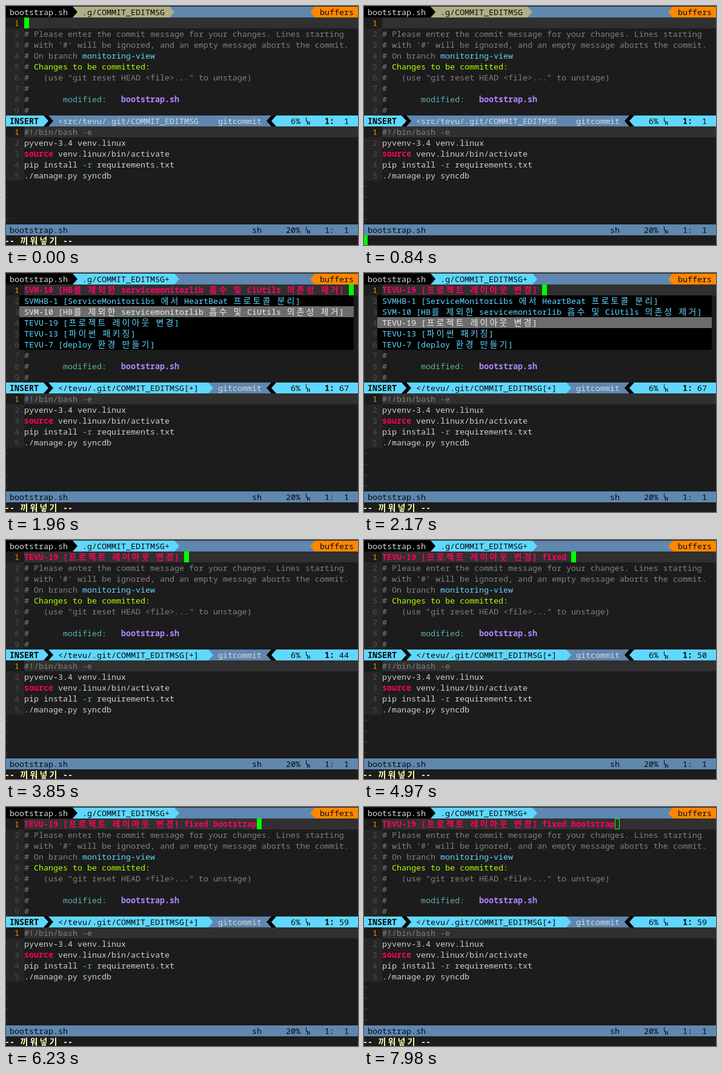
An HTML page for the animation above (8.12 s loop, 581x395 px).

```html
<!DOCTYPE html>
<html lang="ko">
<head>
<meta charset="utf-8">
<title>Commit message completion</title>
<style>
  html, body { margin: 0; width: 100%; height: 100%; overflow: hidden; background: #1c1c1c; }
  #term {
    position: absolute; left: 0; top: 0; width: 581px; height: 395px; overflow: hidden;
    background: #1c1c1c; color: #d0d0d0;
    font: 13.3333px/18px "Noto Sans Mono", "DejaVu Sans Mono", monospace;
    font-kerning: none; font-variant-ligatures: none;
  }
  #term div, #term svg { position: absolute; height: 18px; white-space: pre; }
  /* Hangul takes two cells */
  i {
    display: inline-block; width: 16px; text-align: center;
    font: normal 14px/1 "Noto Sans CJK KR", "Noto Sans CJK", "Noto Sans CJK JP", sans-serif;
    font-weight: inherit;
  }
  .b { font-weight: bold; }
  .right { clip-path: polygon(0 0, 100% 50%, 0 100%); }
  .left { clip-path: polygon(100% 0, 0 50%, 100% 100%); }
  .hollow { box-sizing: border-box; border: 1px solid #00ff00; }
</style>
</head>
<body>
<div id="term"></div>
<script>
const LOOP = 8120, COLS = 73;
const C = {
  text: '#d0d0d0', light: '#dadada', dark: '#080808', black: '#000000',
  gutter: '#262626', number: '#4e4e4e', line: '#303030', comment: '#808080',
  orange: '#ff8700', khaki: '#afaf87', blue: '#5f87af', cyan: '#5fd7ff',
  lime: '#afff00', teal: '#5fafaf', purple: '#af87ff', pink: '#ff005f',
  green: '#00ff00', select: '#6c6c6c', white: '#eeeeee', mode: '#ffffaf'
};
const ISSUES = [
  'SVMHB-1 [ServiceMonitorLibs 에서 HeartBeat 프로토콜 분리]',
  'SVM-10 [HB를 제외한 servicemonitorlib 흡수 및 CiUtils 의존성 제거]',
  'TEVU-19 [프로젝트 레이아웃 변경]',
  'TEVU-13 [파이썬 패키징]',
  'TEVU-7 [deploy 환경 만들기]'
];
const TYPED = 'fixed bootstrap';
// One key per entry; two keys land together at 5320
const KEYS = [4410, 4550, 4620, 4760, 4900, 4970, 5110, 5180,
              5320, 5320, 5740, 5880, 6020, 6090, 6230];

const term = document.getElementById('term');
const cell = (row, col) => `left:${col * 8 - 2}px;top:${row * 18 + 1}px`;
const cells = s => [...s].reduce((n, ch) => n + (/[가-힣]/.test(ch) ? 2 : 1), 0);
const fill = (row, col, width, color, cls = '') =>
  `<div class="${cls}" style="${cell(row, col)};width:${width * 8}px;background:${color}"></div>`;
const put = (row, col, s, color = C.text, cls = '') =>
  `<div class="${cls}" style="${cell(row, col)};color:${color}">` +
  s.replace(/</g, '&lt;').replace(/[가-힣]/g, '<i>$&</i>') + '</div>';
const lineMark = (row, color) =>
  `<svg width="8" height="18" style="${cell(row, 62)}" fill="none" stroke="${color}">` +
  '<path d="M1.5 3V9.5H4.5M3.5 15.5V10L7 15V9.5"/></svg>';

function gutter(top, count, total) {
  let out = fill(top, 4, COLS - 4, C.line);
  for (let n = 1; n <= count; n++) {
    if (n > 1) out += fill(top + n - 1, 0, 4, C.gutter);
    out += put(top + n - 1, 2, String(n), n > 1 ? C.number : C.orange);
  }
  return out;
}

function tabs(modified) {
  const color = modified ? C.cyan : C.khaki;
  const name = '.g/COMMIT_EDITMSG' + (modified ? '+' : '');
  const end = 17 + name.length;
  return fill(0, 0, COLS, C.blue) + fill(0, 14, end - 14, color) +
    fill(0, end, 1, color, 'right') +
    fill(0, 0, 14, C.black) + fill(0, 14, 1, C.black, 'right') +
    put(0, 1, 'bootstrap.sh', C.light) + put(0, 16, name, C.dark) +
    fill(0, 63, 1, C.orange, 'left') + fill(0, 64, 9, C.orange) +
    put(0, 65, 'buffers', C.dark);
}

function status(modified, column) {
  const r = 10;
  let out = fill(r, 0, COLS, C.blue);
  if (modified) out += fill(r, 9, 33, C.cyan) + fill(r, 42, 1, C.cyan, 'right');
  return out +
    fill(r, 8, 1, C.black) + fill(r, 9, 1, C.black, 'right') +
    fill(r, 0, 8, C.cyan) + fill(r, 8, 1, C.cyan, 'right') +
    put(r, 1, 'INSERT', C.dark, 'b') +
    put(r, 11, modified ? '</tevu/.git/COMMIT_EDITMSG[+]' : '<src/tevu/.git/COMMIT_EDITMSG',
        modified ? C.dark : C.light) +
    put(r, 44, 'gitcommit', C.light) +
    fill(r, 54, 1, C.black, 'left') + fill(r, 55, 1, C.black) +
    fill(r, 55, 1, C.cyan, 'left') + fill(r, 56, 17, C.cyan) +
    put(r, 59, '6%', C.dark) + lineMark(r, C.dark) +
    put(r, 66, '1:', C.dark, 'b') + put(r, 68, String(column).padStart(3), C.dark);
}

const commitText =
  put(2, 4, '# Please enter the commit message for your changes. Lines starting', C.comment) +
  put(3, 4, "# with '#' will be ignored, and an empty message aborts the commit.", C.comment) +
  put(4, 4, '# On branch', C.comment) + put(4, 16, 'monitoring-view', C.cyan) +
  put(5, 4, '#', C.comment) + put(5, 6, 'Changes to be committed:', C.lime) +
  put(6, 4, '#   (use "git reset HEAD <file>..." to unstage)', C.comment) +
  put(7, 4, '#', C.comment) +
  put(8, 4, '#', C.comment) + put(8, 12, 'modified:', C.teal) +
  put(8, 24, 'bootstrap.sh', C.purple, 'b') +
  put(9, 4, '#', C.comment);

const script = gutter(11, 5) +
  put(11, 4, '#!/bin/bash -e', C.comment) +
  put(12, 4, 'pyvenv-3.4 venv.linux') +
  put(13, 4, 'source', C.pink, 'b') + put(13, 11, 'venv.linux/bin/activate') +
  put(14, 4, 'pip install') + put(14, 16, '-r', C.teal) + put(14, 19, 'requirements.txt') +
  put(15, 4, './manage.py syncdb') +
  [16, 17, 18, 19].map(r => put(r, 0, '~', C.number)).join('') +
  fill(20, 0, COLS, C.blue) +
  put(20, 1, 'bootstrap.sh', C.dark) + put(20, 51, 'sh', C.dark) +
  put(20, 58, '20%', C.dark) + lineMark(20, C.dark) + put(20, 66, '1:  1', C.dark);

function popup(selected) {
  return ISSUES.map((s, i) => {
    const on = i === selected;
    return fill(i + 2, 3, 69, on ? C.select : C.black) +
      put(i + 2, 4, s, on ? C.white : C.cyan);
  }).join('');
}

function stateAt(t) {
  return {
    modified: t >= 1260,
    busy: t >= 840 && t < 1260,
    open: t >= 1260 && t < 3850,
    pick: t < 1960 ? 0 : t < 2170 ? 1 : 2,
    typed: KEYS.filter(k => t >= k).length,
    focus: t < 7980
  };
}

function view(s) {
  const message = s.modified ? ISSUES[s.pick] + ' ' + TYPED.slice(0, s.typed) : '';
  const column = !s.modified ? 1 : s.open ? 67 : 44 + s.typed;
  const [row, col] = s.busy ? [21, 0] : [1, 4 + cells(message)];
  return tabs(s.modified) + gutter(1, 9) + commitText +
    put(1, 4, message, C.pink, 'b') +
    (s.open ? popup(s.pick) : '') +
    status(s.modified, column) + script +
    (s.busy ? '' : put(21, 0, '-- 끼워넣기 --', C.mode, 'b')) +
    (s.focus ? fill(row, col, 1, C.green) : fill(row, col, 1, 'none', 'hollow'));
}

let shown = '';
const start = performance.now();
function tick() {
  const state = stateAt((performance.now() - start) % LOOP);
  const key = JSON.stringify(state);
  if (key !== shown) {
    shown = key;
    term.innerHTML = view(state);
  }
  requestAnimationFrame(tick);
}
tick();
</script>
</body>
</html>
```
